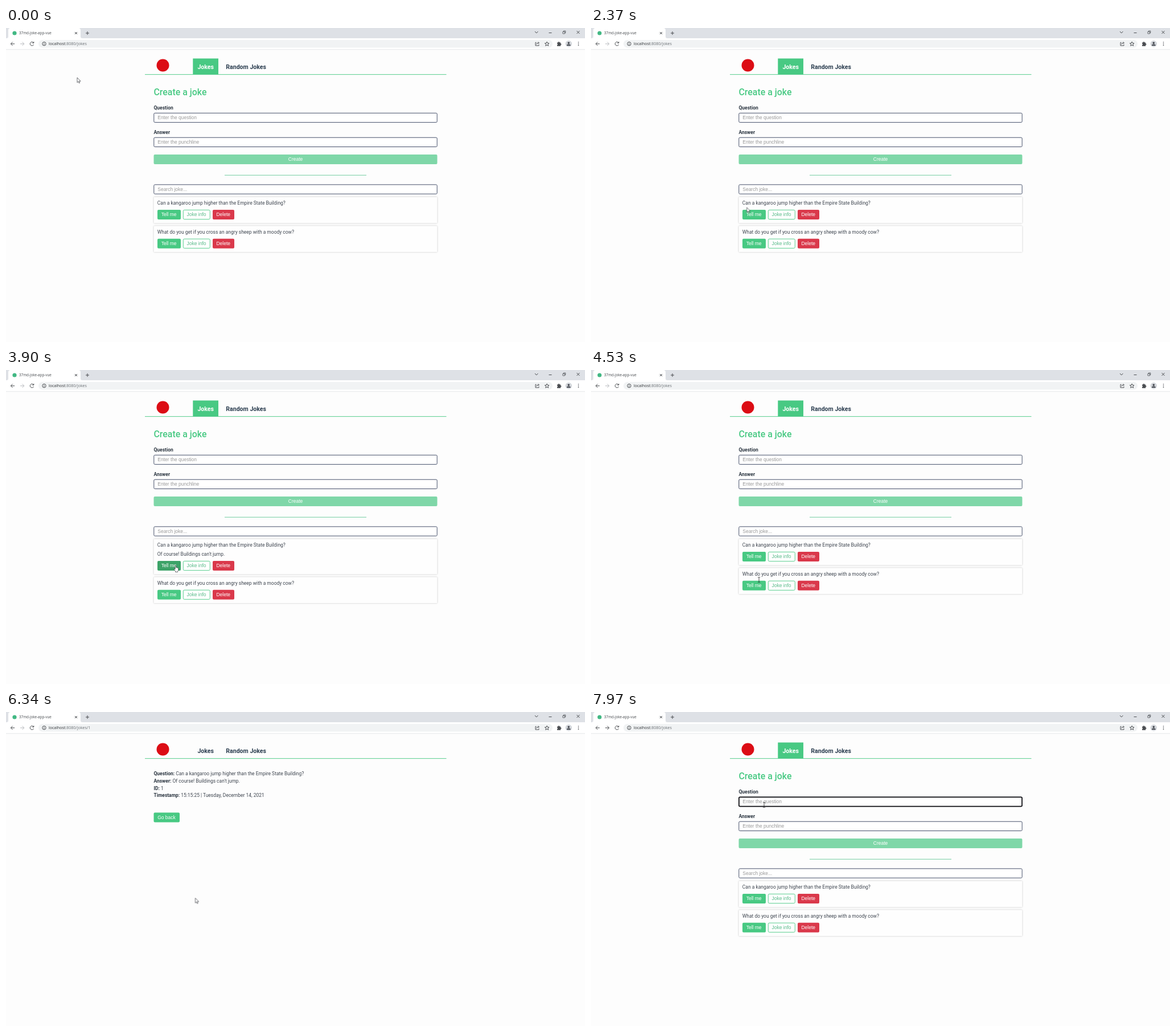
Write an HTML page that moves like this. It is 1017 px wide and 551 px high and loops after 8 s.

```html
<!DOCTYPE html>
<html lang="en">
<head>
<meta charset="utf-8">
<title>Joke app</title>
<style>
  html, body { margin: 0; width: 100%; height: 100%; overflow: hidden; background: #fdfdfd; }
  svg { display: block; width: 100%; height: 100%; }
  :root { --green: #48c983; --dark: #3ca368; --ink: #2c3e50; --red: #da394b; }

  text { font: 8.475px Roboto, sans-serif; fill: #3f4650; white-space: pre; }
  .bold { font-weight: 700; fill: #2b3540; }
  .nav { font-size: 10.59px; font-weight: 700; fill: var(--ink); }
  .title { font-size: 15.9px; font-weight: 500; fill: var(--green); }
  .ui { font-family: "Liberation Sans", Arial, sans-serif; }
  .btn { fill: #fff; }
  .hint { fill: #999; }
  .tab { font: 6.3px "Open Sans", sans-serif; fill: #45494d; }
  .url { font: 7.03px "Open Sans", sans-serif; fill: #6b7075; }
  .host { fill: #2b2e32; }
  .field { fill: #fff; stroke: #46506a; stroke-width: 1; }
  .card { fill: #fefefe; height: 46px; filter: drop-shadow(0 .5px .9px #0004); }
  .green { fill: var(--green); }
  .line { fill: none; stroke: #4a4d51; stroke-width: 1; }

  /* Every part shares one 8 s clock */
  .step { animation: 8s step-end infinite; }
  .fade { animation: 8s linear infinite; }

  .list { animation-name: list; }
  @keyframes list { 0%, 90% { visibility: visible } 78.75% { visibility: hidden } }
  .detail { animation-name: detail; }
  @keyframes detail { 0%, 90% { visibility: hidden } 78.75% { visibility: visible } }
  .active { animation-name: active; }
  @keyframes active { 0%, 90% { fill: #fff } 78.75% { fill: #2c3e50 } }
  .forward { animation-name: forward; }
  @keyframes forward { 0% { stroke: #b8bbbf } 90% { stroke: #4a4d51 } }
  .focus { animation-name: focus; }
  @keyframes focus { 0% { visibility: hidden } 98.1% { visibility: visible } }

  .push1 { animation-name: push1; }
  @keyframes push1 { 0%, 51.9% { transform: none } 41.25% { transform: translateY(16px) } }
  .grow1 { animation-name: grow1; }
  @keyframes grow1 { 0%, 51.9% { height: 46px } 41.25% { height: 62px } }
  .show1 { animation-name: show1; }
  @keyframes show1 { 0%, 51.9% { visibility: hidden } 41.25% { visibility: visible } }

  .push2 { animation-name: push2; }
  @keyframes push2 { 0%, 68.1% { transform: none } 60.6% { transform: translateY(16px) } }
  .grow2 { animation-name: grow2; }
  @keyframes grow2 { 0%, 68.1% { height: 46px } 60.6% { height: 62px } }
  .show2 { animation-name: show2; }
  @keyframes show2 { 0%, 68.1% { visibility: hidden } 60.6% { visibility: visible } }

  .hover1 { animation-name: hover1; }
  @keyframes hover1 {
    0%, 32.5%, 43%, 43.75%, 53.7%, 100% { fill: var(--green) }
    34.4%, 41.25%, 45.6%, 51.9% { fill: var(--dark) }
  }
  .hover2 { animation-name: hover2; }
  @keyframes hover2 {
    0%, 57.5%, 62.4%, 63%, 69.9%, 70.5%, 74%, 100% { fill: var(--green) }
    59.4%, 60.6%, 64.9%, 68.1%, 72.3% { fill: var(--dark) }
  }
  .info { animation-name: info; }
  @keyframes info { 0%, 75%, 78.76%, 100% { opacity: 0 } 76.8%, 78.75% { opacity: 1 } }
  .back { animation-name: back; }
  @keyframes back { 0%, 85% { fill: var(--green) } 86.9%, 100% { fill: var(--dark) } }

  .pointer { animation: move 8s ease-in-out infinite; }
  @keyframes move {
    0% { transform: translate(125px, 87px) }
    18.75% { transform: translate(179px, 255px) }
    34% { transform: translate(293px, 327px) }
    39.1%, 41.25% { transform: translate(298px, 334px) }
    45.6%, 51.9% { transform: translate(298px, 343px) }
    56.6% { transform: translate(295px, 368px) }
    59.4%, 60.6% { transform: translate(298px, 380px) }
    63.8%, 68.1% { transform: translate(298px, 394px) }
    70.5% { transform: translate(298px, 378px) }
    76%, 78.75% { transform: translate(333px, 328px) }
    85.6%, 91% { transform: translate(286px, 184px) }
    97%, 100% { transform: translate(304px, 163px) }
  }
  .arrow { animation-name: arrow; }
  @keyframes arrow {
    0%, 41.25%, 51.9%, 60.6%, 68.1%, 72.5%, 78.75%, 90% { visibility: visible }
    32.5%, 43.75%, 54.5%, 63%, 70.3%, 75%, 85%, 95.2% { visibility: hidden }
  }
  .hand { animation-name: hand; }
  @keyframes hand {
    0%, 41.25%, 51.9%, 60.6%, 68.1%, 72.5%, 78.75%, 90% { visibility: hidden }
    32.5%, 43.75%, 57.5%, 63%, 70.3%, 75%, 85% { visibility: visible }
  }
  .beam { animation-name: beam; }
  @keyframes beam { 0%, 57.5% { visibility: hidden } 54.5%, 95.2% { visibility: visible } }
</style>
</head>
<body>
<svg viewBox="0 0 1017 551" preserveAspectRatio="none">
  <defs>
    <g id="actions">
      <rect x="311.3" y="319.4" width="47" height="16.2" rx="2" fill="#fff" stroke="#48c983" stroke-width=".9"/>
      <text class="ui" x="317.6" y="330.2" style="fill:#55b987">Joke info</text>
      <rect x="363" y="319" width="38" height="17" rx="2" fill="#da394b"/>
      <text class="ui btn" x="369.5" y="330.2">Delete</text>
    </g>
  </defs>

  <!-- Browser window -->
  <rect width="1017" height="18" fill="#dee1e6"/>
  <rect y="18" width="1017" height="19.5" fill="#fff"/>
  <path d="M1 18q3 0 3-3V4q0-4 4-4h119q4 0 4 4v11q0 3 3 3z" fill="#fff"/>
  <rect y="37.4" width="1017" height=".8" fill="#e0e2e5"/>
  <circle cx="15" cy="9" r="3.6" fill="#41b883"/>
  <text class="tab" x="23" y="11.3">37md-joke-app-vue</text>
  <g class="line">
    <path d="M121 7l4 4m0-4l-4 4M140 9h6m-3-3v6"/>
    <path d="M929 6l2.7 3 2.7-3M953.5 8.5h5M1002.5 5l5 5m0-5l-5 5"/>
    <path d="M978 6.5h3.5v3.5H978zM979.3 6.3V5h3.5v3.6h-1.2" stroke-width=".8"/>
    <path d="M15.2 27.8H8.4m3.2-3.2l-3.2 3.2 3.2 3.2"/>
    <path class="step forward" d="M25 27.8h6.8m-3.2-3.2l3.2 3.2-3.2 3.2"/>
    <path d="M48.4 26a3.3 3.3 0 1 0 .2 3M48.8 24v2.4h-2.5"/>
  </g>
  <rect x="57" y="21" width="903" height="13.5" rx="6.7" fill="#f1f3f4"/>
  <g class="line" stroke-width=".8">
    <circle cx="67" cy="27.7" r="3.2"/>
    <path d="M67 27.2v2.3M67 25.7v.8"/>
    <path d="M931.5 25.3H930v5.6h6v-2M931.8 28.8q.3-2.7 3-2.7h1.4m-1.6-1.8l1.8 1.8-1.8 1.8"/>
    <path d="M950.2 24.1l1.1 2.5 2.7.2-2.1 1.8.7 2.7-2.4-1.5-2.4 1.5.7-2.7-2.1-1.8 2.7-.2z"/>
  </g>
  <text class="url" x="75" y="30.2"><tspan class="host">localhost</tspan>:8080/jokes<tspan class="step detail">/1</tspan></text>
  <path d="M968 25.5h2v-.3a1.1 1.1 0 0 1 2.200 0v.3h2v2h.3a1.100 1.100 0 0 1 0 2.200h-.3v2H968v-2a1.100 1.100 0 0 0 0-2.200z" fill="#4a4d51"/>
  <circle cx="988.300" cy="27.700" r="5.700" fill="#d3d6db"/>
  <circle cx="988.300" cy="26.300" r="1.700" fill="#41454c"/>
  <path d="M985 31v-.7q0-1.800 3.300-1.800t3.300 1.800v.7z" fill="#41454c"/>
  <g fill="#4a4d51">
    <circle cx="1005.500" cy="25" r=".8"/><circle cx="1005.500" cy="27.700" r=".8"/><circle cx="1005.500" cy="30.400" r=".8"/>
  </g>

  <!-- Site header -->
  <circle cx="275.500" cy="65.500" r="11" fill="#dc0d15"/>
  <rect class="step list green" x="328.300" y="53.500" width="44.700" height="28"/>
  <text class="step active nav" x="336.400" y="71.700">Jokes</text>
  <text class="nav" x="386.300" y="71.700">Random Jokes</text>
  <rect class="green" x="244" y="81.200" width="529.500" height=".9"/>

  <!-- Jokes page -->
  <g class="step list">
    <text class="title" x="259.500" y="117.700">Create a joke</text>
    <text class="bold" x="259.500" y="143.200">Question</text>
    <rect class="field" x="259.800" y="149.300" width="497.400" height="16.300" rx="1.800"/>
    <rect class="step focus" x="259.900" y="149.400" width="497.200" height="16.200" rx="1.800" fill="none" stroke="#101014" stroke-width="1.700"/>
    <text class="ui hint" x="266.300" y="160.200">Enter the question</text>
    <text class="bold" x="259.500" y="186.200">Answer</text>
    <rect class="field" x="259.800" y="192.200" width="497.400" height="16.300" rx="1.800"/>
    <text class="ui hint" x="266.300" y="203.200">Enter the punchline</text>
    <rect x="259.500" y="222" width="498" height="17" rx="2" fill="#7fd7a8"/>
    <text class="ui btn" x="508.500" y="233.200" text-anchor="middle">Create</text>
    <rect x="384" y="257.800" width="249" height=".9" fill="#63c797"/>
    <rect class="field" x="259.800" y="274.900" width="497.400" height="16.300" rx="1.800"/>
    <text class="ui hint" x="266.300" y="286">Search joke...</text>

    <rect class="step grow1 card" x="259.500" y="296.500" width="498" rx="1.500"/>
    <text x="265.800" y="310.200">Can a kangaroo jump higher than the Empire State Building?</text>
    <text class="step show1" x="265.800" y="326.200">Of course! Buildings can't jump.</text>
    <g class="step push1">
      <rect class="fade hover1" x="266" y="319" width="41" height="17" rx="2"/>
      <text class="ui btn" x="272.700" y="330.200">Tell me</text>
      <use href="#actions"/>
      <g class="fade info">
        <rect class="green" x="310.900" y="319" width="47.900" height="17" rx="2"/>
        <text class="ui btn" x="317.600" y="330.200">Joke info</text>
      </g>
    </g>

    <g class="step push1">
      <rect class="step grow2 card" x="259.500" y="347.300" width="498" rx="1.500"/>
      <text x="265.800" y="361">What do you get if you cross an angry sheep with a moody cow?</text>
      <text class="step show2" x="265.800" y="377">An animal that's in a baaaaad mooood.</text>
      <g class="step push2">
        <rect class="fade hover2" x="266" y="369.800" width="41" height="17" rx="2"/>
        <text class="ui btn" x="272.700" y="381">Tell me</text>
        <use href="#actions" y="50.800"/>
      </g>
    </g>
  </g>

  <!-- Joke info page -->
  <g class="step detail">
    <text x="259.500" y="111.200"><tspan class="bold">Question:</tspan> Can a kangaroo jump higher than the Empire State Building?</text>
    <text x="259.500" y="124"><tspan class="bold">Answer:</tspan> Of course! Buildings can't jump.</text>
    <text x="259.500" y="136.700"><tspan class="bold">ID:</tspan> 1</text>
    <text x="259.500" y="149.400"><tspan class="bold">Timestamp:</tspan> 15:15:25 | Tuesday, December 14, 2021</text>
    <rect class="fade back" x="259.500" y="176.500" width="45.500" height="17" rx="2"/>
    <text class="ui btn" x="266.200" y="187.700">Go back</text>
  </g>

  <!-- Mouse pointer -->
  <g class="pointer" stroke="#33363c" stroke-width=".7" stroke-linejoin="round" fill="#fff">
    <path class="step arrow" d="M0 0v8.700l2-1.900 1.300 3 1.400-.6-1.300-2.900h2.700z"/>
    <path class="step hand" d="M-.9 6.700V.5q0-1 .8-1t.8 1v3.200q.9-.5 1.400.2.900-.4 1.300.4 1.300-.3 1.300 1v2.200q0 1.700-1 2.700v1.300H-.5V10.100l-2.300-3q-.5-.9.3-1.100.7-.1 1.600.7z"/>
    <path class="step beam" d="M-2-4.500q1.600 0 2 .8.400-.8 2-.8M0-3.700v7.400M-2 4.500q1.600 0 2-.8.400.8 2 .8" fill="none" stroke="#222" stroke-width=".8"/>
  </g>
</svg>
</body>
</html>
```
